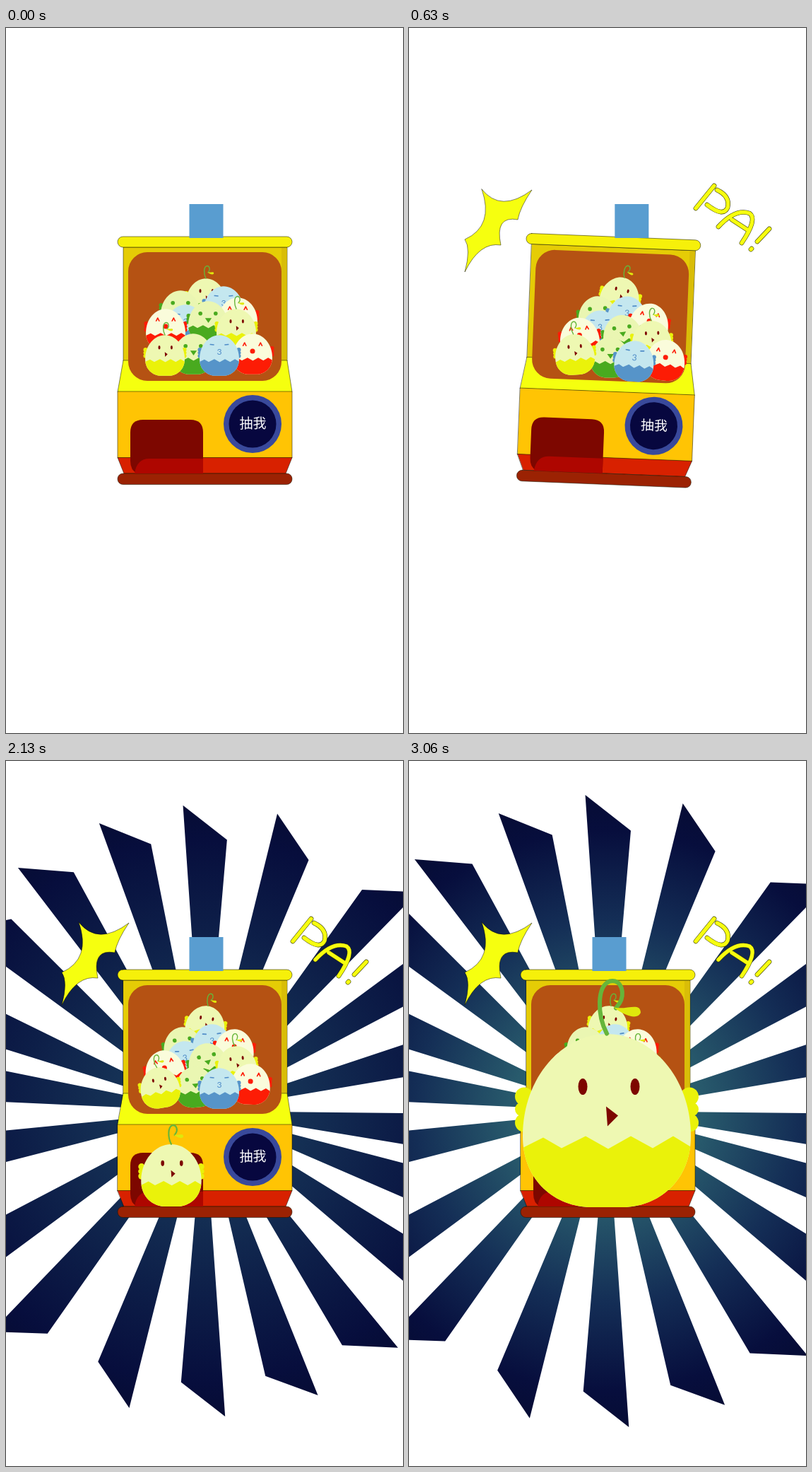
An HTML page with a canvas for the animation above (3090 ms loop, 562x997 px).

```html
<!DOCTYPE html>
<html lang="zh">
<head>
<meta charset="utf-8">
<title>Capsule machine</title>
<style>
html, body { margin: 0; width: 100%; height: 100%; overflow: hidden; background: #fff; }
canvas { display: block; width: 100%; height: 100%; }
</style>
</head>
<body>
<canvas id="stage" width="562" height="997"></canvas>
<script>
const ctx = document.getElementById('stage').getContext('2d');
const LOOP = 3090, STEP = 30, RAYS_AT = 1350, POP_AT = 180;
const MID = { x: 281, y: 498.5 };
const RAD = Math.PI / 180;
const EDGE = 'rgba(20,20,0,.75)';

const clamp = v => Math.max(0, Math.min(1, v));
const mix = (a, b, k) => a + (b - a) * k;

// Linear keyframes: [time, value, ...]
function keys(list, t) {
  if (t <= list[0][0]) return list[0].slice(1);
  for (let i = 1; i < list.length; i++) {
    const [a, b] = [list[i - 1], list[i]];
    if (t <= b[0]) {
      const k = (t - a[0]) / (b[0] - a[0]);
      return b.slice(1).map((v, j) => mix(a[j + 1], v, k));
    }
  }
  return list[list.length - 1].slice(1);
}

function fill(path, color, outline) {
  ctx.fillStyle = color;
  ctx.fill(path);
  if (outline) {
    ctx.strokeStyle = outline;
    ctx.lineWidth = 0.7;
    ctx.stroke(path);
  }
}

function box(x0, y0, x1, y1, r = 0) {
  const p = new Path2D();
  p.roundRect(x0, y0, x1 - x0, y1 - y0, r);
  return p;
}

function disc(x, y, rx, ry = rx) {
  const p = new Path2D();
  p.ellipse(x, y, rx, ry, 0, 0, 7);
  return p;
}

function line(d, color, width) {
  ctx.strokeStyle = color;
  ctx.lineWidth = width;
  ctx.lineCap = ctx.lineJoin = 'round';
  ctx.stroke(new Path2D(d));
}

// ---- chicks ----
const BODY = new Path2D('M0 -122.5C62 -122.5 119 -62 119 22C119 86 72 122.5 22 122.5H-22C-72 122.5 -119 86 -119 22C-119 -62 -62 -122.5 0 -122.5Z');
const SHELL = new Path2D('M-122 40L-90 24L-64 39L-30 22L2 40L34 22L65 39L94 22L122 39V130H-122Z');
const LOOKS = {
  yellow: { top: '#eef8b2', base: '#eaf20a', ink: '#7d0600' },
  green: { top: '#eaf6b2', base: '#49aa1f', ink: '#49aa1f' },
  blue: { top: '#c4e7ef', base: '#5694c9', ink: '#4f8cc8' },
  red: { top: '#fafcdb', base: '#fd1c05', ink: '#fd1c05' }
};
const FACES = {
  yellow(ink) {
    fill(disc(-34, -48, 6.5, 11.5), ink);
    fill(disc(40, -48, 6.5, 11.5), ink);
    fill(new Path2D('M-1 -20L16 -7L1 8Z'), ink);
    line('M0 -123C-14 -150 -14 -190 4 -197C22 -201 26 -178 18 -166L13 -159', '#66b53a', 6);
    fill(new Path2D('M10 -160C28 -156 47 -168 48 -153C45 -143 28 -146 10 -160Z'), '#dfe80c');
  },
  green(ink) {
    fill(disc(-46, -48, 12), ink);
    fill(disc(46, -48, 12), ink);
    fill(new Path2D('M-18 -20H22L2 8Z'), ink);
  },
  blue(ink) {
    line('M-54 -66L-34 -64M34 -64L54 -66', ink, 7);
    ctx.fillStyle = ink;
    ctx.font = '52px Lato, sans-serif';
    ctx.textAlign = 'center';
    ctx.textBaseline = 'middle';
    ctx.fillText('3', 0, -20);
  },
  red(ink) {
    line('M-57 -50L-48 -68L-39 -50M39 -50L48 -68L57 -50', ink, 7);
    fill(disc(0, -17, 15), ink);
  }
};

function chick(kind, x, y, deg, size) {
  const look = LOOKS[kind];
  ctx.save();
  ctx.translate(x, y);
  ctx.rotate(deg * RAD);
  ctx.scale(size, size);
  for (const side of [-1, 1]) {
    for (const [dx, dy, r] of [[117, -34, 13], [120, -16, 10], [117, 3, 13]]) {
      fill(disc(side * dx, dy, r), look.base);
    }
  }
  fill(BODY, look.top);
  ctx.save();
  ctx.clip(BODY);
  fill(SHELL, look.base);
  ctx.restore();
  FACES[kind](look.ink);
  ctx.restore();
}

// kind, resting x, y, tilt, then the starting offset
const PILE = [
  ['yellow', 282, 375, 8, 1, 8],
  ['green', 251, 405, -8, -4, -5],
  ['blue', 292, 401, -3, 16, -7],
  ['red', 323, 408, 3, 5, 2],
  ['blue', 254, 425, -6, 0, -5],
  ['red', 225, 438, -9, 1, -12],
  ['green', 286, 428, -12, 0, -13],
  ['yellow', 327, 432, -6, -1, -6],
  ['green', 268, 461, -5, -3, 0],
  ['red', 346, 457, 2, 3, 4],
  ['blue', 302, 463, 0, 0, 0],
  ['yellow', 218, 462, -9, 7, 1]
];
const SLOSH = [
  [0, 0, 0, 0, 0, 0],
  [390, -30, 6, 0.36, -0.2, -9],
  [740, 38, 7.5, -0.16, 0.24, 11],
  [1110, 0, 0, 0, 0, 0]
];

function pile(t) {
  const [dx, dy, kx, ky, turn] = keys(SLOSH, t);
  const early = 1 - clamp((t - 390) / 240);
  for (const [kind, bx, by, tilt, ox, oy] of PILE) {
    const x = bx + ox * early, y = by + oy * early;
    chick(kind, x + dx + kx * (y - 425), y + dy + ky * (x - 290), tilt * (1 - early) + turn, 0.235);
  }
}

// ---- machine ----
const DOOR = new Path2D('M176 572Q176 554 194 554H261Q279 554 279 572V630H186Q176 626 176 612Z');

function cabinet() {
  fill(box(166, 310, 398, 471), '#e5cc06', EDGE);
  fill(box(390, 311, 397.5, 470), '#d9bd08');
  fill(new Path2D('M166 470H398L405 514.5H158Z'), '#f5ff0f', EDGE);
  fill(box(158, 295, 405, 310, 7.5), '#f6f00a', EDGE);
  fill(box(173, 317, 390, 499, 27), '#b55213');
  fill(box(158, 514, 405, 608), '#ffc404', EDGE);
  fill(new Path2D('M158 607.5H405L396 630H167Z'), '#d82100', EDGE);
  fill(box(158, 630, 405, 645.5, 7.5), '#9b2203', EDGE);
  fill(DOOR, '#7d0700');
  fill(new Path2D('M182 630Q185 609 203 609H279V630Z'), '#ae0600');
  fill(disc(349, 560, 41), '#39499b');
  fill(disc(349, 560, 33.5), '#07073f');
  ctx.fillStyle = '#fff';
  ctx.font = '500 19px "Noto Sans CJK SC", "Noto Sans CJK", sans-serif';
  ctx.textAlign = 'center';
  ctx.textBaseline = 'alphabetic';
  ctx.fillText('抽我', 349.5, 566);
}

const TILT = [[0, 0], [180, 8.8], [420, 0.4], [630, 2.3], [750, 4.65], [1110, 0]];
const SIGN = [[0, 0], [375, -56], [735, 68], [1110, 0]];

function machine(t) {
  ctx.save();
  ctx.translate(MID.x, MID.y);
  ctx.rotate(keys(TILT, t)[0] * RAD);
  ctx.translate(-MID.x, -MID.y);
  cabinet();
  ctx.restore();
  const x = 283.5 + keys(SIGN, t)[0];
  fill(box(x - 24, 249, x + 24, 297), '#599dd0');
}

// ---- effects ----
const BURST = new Path2D('M103 228Q130 262 174 229Q157 254 154 271Q121 265 130 307Q100 302 79 345Q88 312 79 299Q121 280 103 228Z');
const SHOUT = 'M421 228M432 223L406 255M436 229Q455 238 451 254Q445 268 422 250' +
  'M438 281Q462 255 482 262Q494 270 471 304M457 271L480 286M510 284L493 302M484 313L485 312';

function shout() {
  fill(BURST, '#f6ff0f', EDGE);
  line(SHOUT, '#3a3a08', 6.6);
  line(SHOUT, '#f6ff0f', 5.4);
}

const RAYS = [0.5, 18.3, 40, 58, 76, 95, 109, 126, 145, 162.5,
  180.4, 198.5, 219.5, 238, 260, 277, 291.7, 310.5, 327, 344.4];

function rays(t) {
  const age = t - RAYS_AT;
  const beat = age / 570 % 1;
  const size = 1 - 0.09 * Math.min(beat, 1 - beat);
  const glow = 0.5 + 0.5 * Math.cos((age - 210) / 375 * 2 * Math.PI);
  const tone = (a, b) => `rgb(${a.map((v, i) => Math.round(mix(v, b[i], glow)))})`;
  const g = ctx.createRadialGradient(0, 0, 0, 0, 0, 450);
  g.addColorStop(0, tone([24, 54, 92], [52, 112, 122]));
  g.addColorStop(0.3, tone([21, 49, 85], [40, 90, 108]));
  g.addColorStop(0.6, tone([13, 30, 72], [20, 46, 86]));
  g.addColorStop(0.88, '#070e3d');
  g.addColorStop(1, '#060c34');
  ctx.save();
  ctx.translate(280, 495);
  ctx.scale(size, size);
  const p = new Path2D();
  for (const a of RAYS) {
    const flip = a === 40 || a === 219.5;
    p.moveTo(0, 0);
    for (const side of [-1, 1]) {
      const r = (side < 0) !== flip ? 448 : 398;
      const w = (a + side * 4.4) * RAD;
      p.lineTo(r * Math.sin(w), -r * Math.cos(w));
    }
    p.closePath();
  }
  fill(p, g);
  ctx.restore();
}

// The prize drops into the hatch, then grows towards the viewer.
function prize(t) {
  const drop = clamp((t - RAYS_AT) / 240);
  const grow = Math.max(0, t - 1950) / 1110;
  ctx.save();
  if (!grow) ctx.clip(DOOR);
  chick('yellow', mix(225, 280, grow), mix(mix(528, 601, drop), 508.5, grow), 0, mix(0.235, 1, grow));
  ctx.restore();
}

function draw(t) {
  ctx.fillStyle = '#fff';
  ctx.fillRect(0, 0, 562, 997);
  if (t >= RAYS_AT) rays(t);
  machine(t);
  pile(t);
  if (t >= POP_AT) shout();
  if (t >= RAYS_AT) prize(t);
}

const start = performance.now();
function tick() {
  const t = (performance.now() - start) % LOOP;
  draw(Math.floor(t / STEP) * STEP);
  requestAnimationFrame(tick);
}
tick();
</script>
</body>
</html>
```
